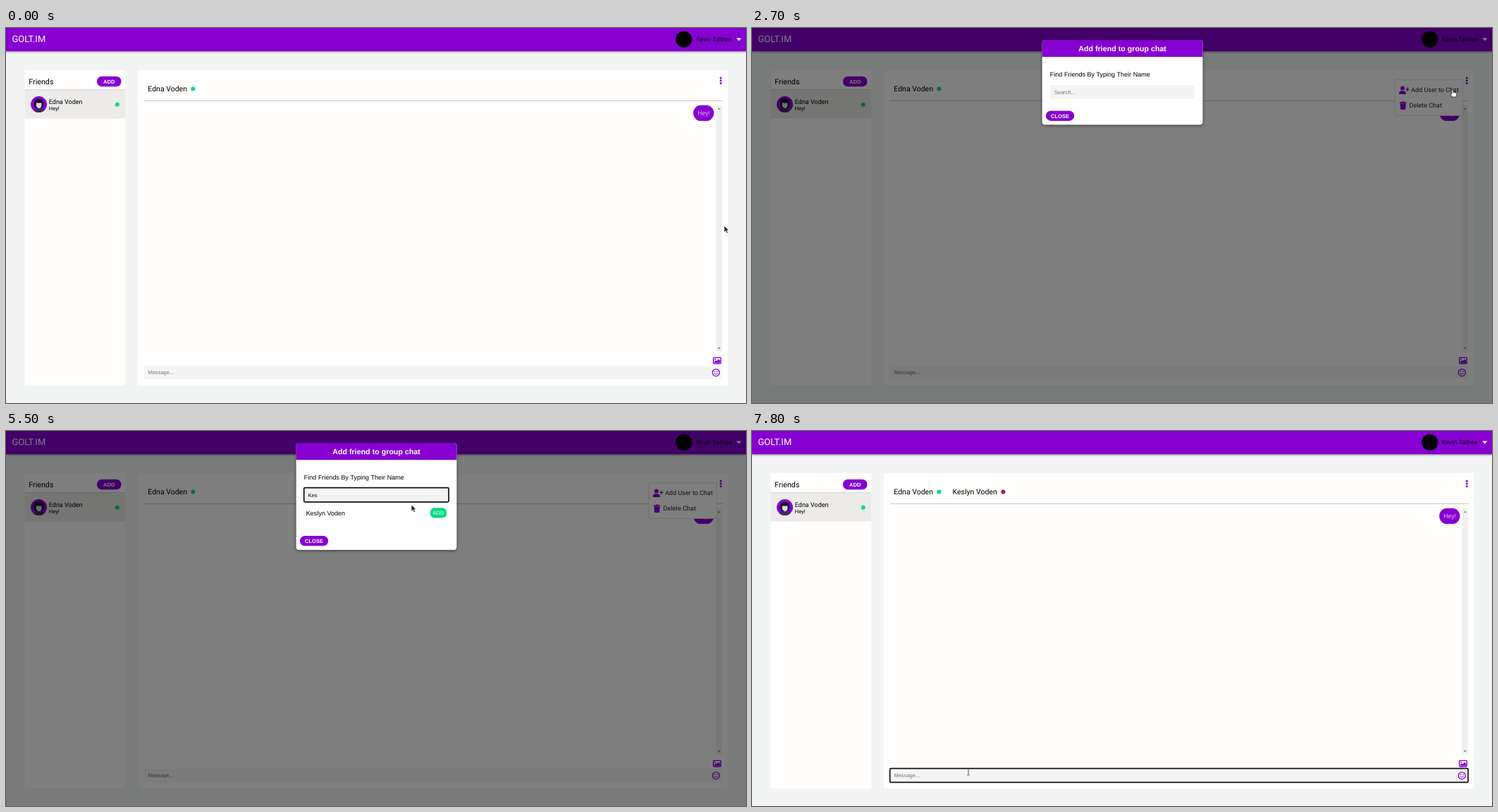
An HTML page that plays this animation: 1050x533 px, repeating every 8000 ms.

```html
<!DOCTYPE html>
<html lang="en">
<head>
<meta charset="utf-8">
<title>Group chat</title>
<style>
html, body { margin: 0; width: 100%; height: 100%; overflow: hidden; background: #f3f5f5; }
svg { display: block; width: 1050px; height: 533px; text-rendering: geometricPrecision; }
text { font: 9px Roboto, sans-serif; white-space: pre; }
.ui { font: 9.06px "Liberation Sans", Arial, sans-serif; }
.field { font: 7.55px "Liberation Sans", Arial, sans-serif; }
.btn { font: bold 7.6px "Liberation Sans", Arial, sans-serif; }
.head { font-size: 10.5px; }
.mid { text-anchor: middle; }
.purple { fill: #8600d2; }
.white { fill: #fff; }
.green { fill: #05dc82; }
.panel { fill: #fffefd; }
.input { fill: #f3f5f5; }
.hint { fill: #757575; }
.focus { fill: none; stroke: #101010; stroke-width: 1.7; }
.line { fill: none; stroke: #8600d2; stroke-width: 1.4; stroke-linecap: round; }
</style>
</head>
<body>
<svg viewBox="0 0 1050 533">
  <rect class="input" width="1050" height="533"/>

  <!-- top bar -->
  <rect class="purple" width="1050" height="33" style="filter:drop-shadow(0 1.5px 1.5px #0007)"/>
  <text class="white" x="8.5" y="20.3" style="font-size:13px">GOLT.IM</text>
  <circle cx="961.8" cy="16" r="11.6"/>
  <text x="979" y="19.3" style="font-size:8.85px">Kevin Taltree</text>
  <path class="white" d="M1036.3 14.3h7l-3.5 4.2z"/>

  <!-- friends -->
  <rect class="panel" x="26.5" y="60" width="142.7" height="448"/>
  <text x="32.3" y="80" style="font-size:10.7px">Friends</text>
  <rect class="purple" x="129" y="68.8" width="34.5" height="14.4" rx="7"/>
  <text class="btn white mid" x="146.3" y="78.7">ADD</text>
  <rect x="26.5" y="87.5" width="142.7" height="41" fill="#ecebea"/>
  <path d="M26.5 87.7h142.7" stroke="#d5d4d4"/>
  <circle class="purple" cx="46.6" cy="108.6" r="11.5"/>
  <path d="M40 110.5C39 103 42 100.8 46.5 100.8S54 103 53 111.5L51 114H42z" fill="#16101c"/>
  <path d="M42.8 106.5h7.6v4.2q-1 3.4-3.3 3.6-3.4-.5-4.3-4z" fill="#ddd5e8"/>
  <path d="M39.3 117.4q2.2-2.8 6-3.2h2.6q4 .5 6 3.2-6.7 5-14.6 0z" fill="#3c304d"/>
  <text x="60.8" y="107.6">Edna Voden</text>
  <text x="60.8" y="116.8" style="font-size:7.6px">Hey!</text>
  <circle class="green" cx="157.8" cy="108.7" r="3"/>

  <!-- conversation -->
  <rect class="panel" x="187" y="60" width="837.3" height="448"/>
  <text class="head" x="201.3" y="90">Edna Voden</text>
  <circle class="green" cx="265.4" cy="86.6" r="3"/>
  <g id="guest">
    <text class="head" x="284.6" y="90">Keslyn Voden</text>
    <circle cx="356.4" cy="86.6" r="3" fill="#c20f40"/>
  </g>
  <g class="purple"><circle cx="1014.2" cy="71" r="1.5"/><circle cx="1014.2" cy="74.8" r="1.5"/><circle cx="1014.2" cy="78.6" r="1.5"/></g>
  <path d="M195.5 103.4H1017" stroke="#c4c4c4"/>
  <rect class="purple" x="975.2" y="109.7" width="29.3" height="22.4" rx="11"/>
  <text class="white mid" x="989.9" y="124" style="font-weight:300">Hey!</text>
  <rect x="1007.5" y="109.7" width="8.6" height="350" fill="#f0f0f0"/>
  <path d="M1009.7 116l2.1-2.5 2.1 2.5zM1009.7 454l2.1 2.5 2.1-2.5z" fill="#858585"/>
  <rect class="line" x="1003.7" y="468.4" width="10.6" height="8.6" rx="1"/>
  <path class="purple" d="M1005 475.8v-1.6l2-2 1.3 1.2 2.7-3 2.3 2.6v2.8z"/>
  <circle class="purple" cx="1006.3" cy="470.8" r="1"/>
  <rect class="input" x="195.7" y="479.8" width="820.6" height="19.5"/>
  <text class="field hint" x="201.4" y="492.2">Message...</text>
  <g class="line"><circle cx="1007.3" cy="489.8" r="5" style="stroke-width:1.3"/><path d="M1004.9 491.2q2.4 2.5 4.8 0" style="stroke-width:1"/></g>
  <circle class="purple" cx="1005.5" cy="488.4" r=".8"/><circle class="purple" cx="1009.1" cy="488.4" r=".8"/>
  <rect class="focus" id="messageFocus" x="195.7" y="479.6" width="820.4" height="19.8" rx="1.5"/>
  <path id="messageCaret" d="M201.6 485.2v8.8" stroke="#000" stroke-width=".7"/>

  <!-- chat menu -->
  <g id="menu">
    <rect class="panel" x="912" y="73.5" width="96.6" height="51" rx="1.5" stroke="#d6d6d6" stroke-width=".8"/>
    <g class="purple">
      <circle cx="923" cy="85.4" r="2.9"/>
      <path d="M918 94v-1.3q.4-3.3 3.6-3.5h2.8q3.2.2 3.6 3.5V94z"/>
      <path d="M929.3 84.8h1.3v2h1.9v1.3h-1.9v2h-1.3v-2h-1.9v-1.3h1.9z"/>
      <path d="M919 105.3h2.8l.7-.9h2.4l.7.9h2.8v1.4H919zM919.6 107.3h8.2l-.5 7.6q-.1 1-1.1 1h-5q-1 0-1.1-1z"/>
    </g>
    <g fill="#222"><text x="935.2" y="91">Add User to Chat</text><text x="932.6" y="113.2">Delete Chat</text></g>
  </g>

  <!-- dialog -->
  <g id="dialog">
    <rect width="1050" height="533" fill-opacity=".5"/>
    <rect class="white" id="card" x="411.7" y="17" width="227.8" rx="4" style="filter:drop-shadow(0 1px 2px #0008)"/>
    <path class="purple" d="M411.7 41V21q0-4 4-4h219.8q4 0 4 4v20z"/>
    <text class="btn white mid" x="525.6" y="32.7" style="font-size:10.7px">Add friend to group chat</text>
    <text class="ui" x="422.8" y="69.4">Find Friends By Typing Their Name</text>
    <rect class="input" x="422.8" y="81" width="205.2" height="19.6"/>
    <text class="field" id="query" x="428.7" y="93.5"></text>
    <rect class="focus" id="searchFocus" x="422.8" y="80.7" width="205.4" height="20.1" rx="1.5"/>
    <path id="searchCaret" d="M0 86.2v8.8" stroke="#000" stroke-width=".8"/>
    <g id="results"></g>
    <g id="close">
      <rect class="purple" x="417" y="117.7" width="40.2" height="14.2" rx="7"/>
      <text class="btn white mid" x="437.1" y="127.5">CLOSE</text>
    </g>
  </g>

  <g id="cursor">
    <path id="arrow" d="M0 0v9.4l2.2-2 1.5 3.5 1.7-.8-1.5-3.3h3z" fill="#222" stroke="#fff" stroke-width=".7"/>
    <path id="hand" d="M-1 .8q1-1.4 2 0v3.3l4 .8q1.2.4 1 1.8l-.6 2.8-.6 1.2h-5L-3 7.1q-.3-1.6 1-1.2l1 .9z" fill="#fff" stroke="#222" stroke-width=".8" stroke-linejoin="round"/>
    <path id="beam" d="M-1.8-4.5H-.6L0-4l.6-.5h1.2M0-4v8M-1.8 4.5H-.6L0 4l.6.5h1.2" fill="none" stroke="#444" stroke-width=".9"/>
  </g>
</svg>
<script>
const LOOP = 8000, STEP = 100;
const $ = id => document.getElementById(id);
const show = (id, on) => $(id).style.display = on ? '' : 'none';
const within = (t, from, to) => t >= from && t < to;

const people = ['Keslyn Voden', 'Jorike Pallin', 'Mikel Dastrom', 'Keona Virrel',
  'Oskern Hadley', 'Brooke Tansil', 'Marke Ullvin', 'Kelda Formby'];
const ROW = 28.7;

// Pointer stops: time, x, y
const stops = [
  [0, 1019, 281], [100, 1019, 281], [200, 1024, 240], [300, 1023, 190], [400, 1018, 148],
  [500, 1018, 148], [1000, 1014, 75], [1700, 1014, 75], [2100, 994, 87.3],
  [3000, 994, 87.3], [3600, 546, 85], [3900, 546, 85], [4000, 549.3, 88.2],
  [5300, 549.3, 88.2], [5600, 588, 113], [5700, 588, 113], [5800, 606, 119],
  [5900, 606, 119], [6000, 615, 116], [6400, 615, 116], [6700, 452, 384],
  [6800, 452, 384], [7200, 307, 484.5], [LOOP, 307, 484.5]
];

$('results').innerHTML = people.map((name, i) => `<g transform="translate(0 ${i * ROW})">
  <text class="ui" x="425.8" y="119.7">${name}</text>
  <rect class="green" x="602" y="109.2" width="23.2" height="14.3" rx="6"/>
  <text class="field white mid" x="613.6" y="119">ADD</text></g>`).join('');

function pointerAt(t) {
  const i = stops.findIndex(s => s[0] > t);
  const [t0, x0, y0] = stops[i - 1], [t1, x1, y1] = stops[i];
  const k = (t - t0) / (t1 - t0);
  return [x0 + (x1 - x0) * k, y0 + (y1 - y0) * k];
}

function drawDialog(t) {
  const rows = t < 4200 ? 0 : t < 4600 ? people.length : 1;
  const extra = rows && 31.4 + (rows - 1) * ROW;
  const typed = t < 4200 ? 0 : t < 4400 ? 1 : t < 4600 ? 2 : 3;
  const focused = within(t, 3600, 6200);
  const query = $('query');
  query.textContent = typed ? 'Kes'.slice(0, typed) : focused || t < 3600 ? 'Search...' : '';
  query.setAttribute('class', typed ? 'field' : 'field hint');
  $('card').setAttribute('height', 120.6 + extra);
  $('close').setAttribute('transform', `translate(0 ${extra})`);
  [...$('results').children].forEach((row, i) => row.style.display = i < rows ? '' : 'none');
  show('searchFocus', focused);
  show('searchCaret', focused && typed && !within(t, 5200, 5800));
  const caretX = 428.9 + 7.55 * [0, .667, 1.223, 1.723][typed];
  $('searchCaret').setAttribute('transform', `translate(${caretX})`);
}

function draw(now) {
  const t = Math.floor(now % LOOP / STEP) * STEP;
  show('menu', within(t, 1500, 6300));
  show('dialog', within(t, 2700, 6300));
  show('guest', t >= 6300);
  show('messageFocus', t >= 7400);
  show('messageCaret', within(t, 7400, 7800));
  drawDialog(t);
  const hand = within(t, 1200, 3100) || within(t, 5800, 6500);
  const beam = within(t, 3600, 5400) || t >= 7200;
  show('hand', hand);
  show('beam', beam);
  show('arrow', !hand && !beam);
  $('cursor').setAttribute('transform', `translate(${pointerAt(t)})`);
}

const start = performance.now();
function tick() {
  draw(performance.now() - start);
  requestAnimationFrame(tick);
}
tick();
</script>
</body>
</html>
```
